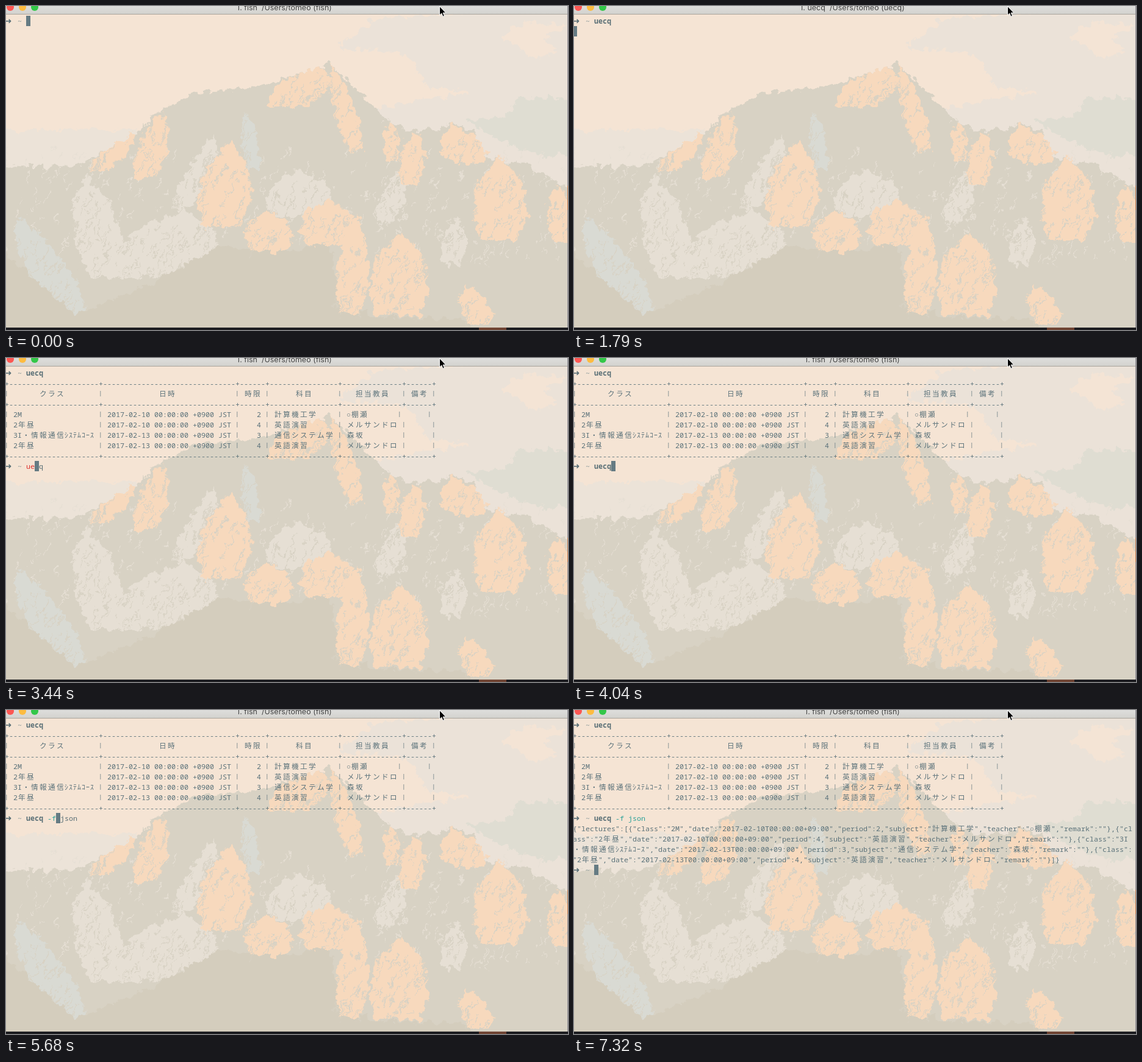
Recreate the animation shown at these times as an HTML page. Size 921 by 532 pixels, loop 8000 ms.

```html
<!DOCTYPE html>
<html lang="ja">
<head>
<meta charset="utf-8">
<title>Terminal</title>
<style>
  html, body { margin: 0; width: 100%; height: 100%; overflow: hidden; background: #1c1c20; }
  svg { display: block; }
  text { white-space: pre; }
  #term text {
    font: 500 11.667px "Noto Sans Mono", "Noto Sans CJK JP", "Noto Sans CJK", "DejaVu Sans Mono", monospace;
    fill: #5b727a;
  }
  #term .cmd { fill: #586e75; font-weight: 600; }
  #term .bad { fill: #dc322f; }
  #term .opt { fill: #2aa198; }
  #term .hint { fill: #586e75; }
  #term .dir { fill: #839496; }
  #term .bar { font-size: 9.5px; }
  #term .arrow { font: bold 13px "DejaVu Sans", sans-serif; fill: #586e75; }
  #title { font: 12.5px Inter, sans-serif; fill: #454545; text-anchor: middle; }
</style>
</head>
<body>
<svg width="921" height="532" viewBox="0 0 921 532">
  <defs>
    <linearGradient id="chrome" x2="0" y2="1">
      <stop stop-color="#dededc"/><stop offset="1" stop-color="#d3d2ce"/>
    </linearGradient>
    <clipPath id="pane"><path d="M0 14H920V528H0Z"/></clipPath>
    <filter id="rough" x="0" y="0" width="921" height="532" filterUnits="userSpaceOnUse" color-interpolation-filters="sRGB">
      <feTurbulence type="fractalNoise" baseFrequency=".08" numOctaves="4" seed="4"/>
      <feDisplacementMap in="SourceGraphic" scale="20" xChannelSelector="R" yChannelSelector="G"/>
    </filter>
  </defs>
  <path fill="#f5e4d4" d="M0 13H920V528H0Z"/>
  <g clip-path="url(#pane)"><g id="photo" filter="url(#rough)"></g></g>
  <path fill="#8d8a92" d="M920 0h1v528h-1z"/>
  <path fill="#c07a50" d="M920 295h1v40h-1z"/>
  <path fill="#6f4433" d="M775 528h45v4h-45z"/>
  <path fill="url(#chrome)" d="M0 0H920V13H0Z"/>
  <path fill="#a9a49c" d="M0 13H920V14H0Z"/>
  <circle cx="7" cy="2" r="6" fill="#fc5753"/>
  <circle cx="27" cy="2" r="6" fill="#fdbc40"/>
  <circle cx="47" cy="2" r="6" fill="#33c748"/>
  <text id="title" x="456" y="7"></text>
  <g id="term"></g>
  <path fill="#000" stroke="#fff" d="M710.5 .5v14.5l3.3-3 2.2 5.3 2.5-1-2.2-5.1h4.5z"/>
</svg>
<script>
const CELL = 7, LINE = 17, LEFT = -2, TOP = 16, COLS = 131, LOOP = 8000;
const term = document.getElementById('term');
const title = document.getElementById('title');
const photo = document.getElementById('photo');

function add(parent, tag, attrs, content = '') {
  const node = document.createElementNS('http://www.w3.org/2000/svg', tag);
  for (const name in attrs) node.setAttribute(name, attrs[name]);
  node.textContent = content;
  return parent.appendChild(node);
}

// Wallpaper
const ROCK = '#d8d2c4', SNOW = '#e6dfd4', SUNLIT = '#f7d9bd', ICE = '#d9dad3';

let seed = 7;
const random = () => (seed = seed * 16807 % 2147483647) / 2147483647;

const area = (fill, d) => add(photo, 'path', { fill, d });

// Slanting streaks; place() returns the start of each
function streaks(count, stroke, place) {
  let d = '';
  while (count-- > 0) {
    const length = 5 + random() * 14;
    d += `M${place()}l${-length * .45} ${length}`;
  }
  add(photo, 'path', { d, stroke, 'stroke-width': 1.6, fill: 'none' });
}

// A face of the mountain: a pointed slab from its peak down, shifted sideways by lean
function face(fill, x, y, width, height, lean) {
  const at = (side, depth) => [x + lean * depth + side * width, y + height * depth];
  area(fill, `M${[at(0, 0), at(.4, .3), at(.5, .7), at(.35, 1), at(-.35, 1), at(-.5, .7), at(-.4, .3)].join('L')}Z`);
  streaks(width * height / 220, ROCK, () => at((random() - .5) * .9, .2 + random() * .75));
}

area('#ece3d8', 'M-20 208Q100 198 260 206V300H-20Z');
area('#ebe2d8', 'M540 70L604 20 940 0V300H700L600 168 765 141 692 134 655 78Z');
area('#f4e4d5', 'M812 48L850 24 921 32 880 56 905 72 870 88Z');
area('#dfddd2', 'M752 188L820 180 840 150 940 152V238L880 250 800 215Z');
area(ROCK, 'M-20 264L120 262 215 208 250 174 310 142 420 131 530 94 580 142 620 184 665 207 740 196 765 203 788 250 850 258 940 310V550H-20Z');
streaks(260, SNOW, () => [random() * 921, 230 + random() * 180]);

[
  [130, 275, 80, 170, 35],
  [290, 335, 170, 110, -40],
  [345, 210, 40, 125, -60],
  [480, 270, 110, 75, 0],
  [655, 258, 40, 95, -35],
  [740, 345, 40, 80, -10],
].forEach(slab => face(SNOW, ...slab));

face(ICE, 392, 172, 26, 95, 14);
face(ICE, 20, 345, 75, 160, 85);
area('#d4cdbd', 'M-20 390L112 506 230 460 350 394 470 405 530 382 545 470 600 510 760 515V550H-20Z');

[
  [212, 208, 44, 62, -62],
  [258, 174, 50, 108, -32],
  [515, 98, 90, 68, -55],
  [534, 97, 36, 140, 40],
  [368, 222, 88, 140, -16],
  [430, 335, 80, 68, 0],
  [528, 318, 95, 75, 0],
  [575, 340, 52, 165, -12],
  [648, 372, 98, 136, -6],
  [632, 188, 28, 65, 0],
  [672, 208, 44, 85, -12],
  [735, 197, 75, 62, 22],
  [810, 248, 90, 135, -2],
  [905, 293, 46, 95, 8],
  [756, 458, 50, 65, 22],
].forEach(slab => face(SUNLIT, ...slab));

// Character grid
const isWide = ch => /[\u3041-\u9fff]/.test(ch);

function put(col, row, str, cls = '') {
  const xs = [];
  for (const ch of str) {
    xs.push(LEFT + col * CELL + (isWide(ch) ? 1 : 0));
    col += isWide(ch) ? 2 : 1;
  }
  const y = TOP + row * LINE + (cls === 'bar' ? 11 : 13);
  add(term, 'text', { x: xs.join(' '), y, class: cls }, str.replace(/ /g, '\u00a0'));
}

function cursor(col, row) {
  add(term, 'rect', { x: LEFT + col * CELL, y: TOP + row * LINE, width: CELL, height: LINE, fill: '#657b83' });
}

const lectures = [
  ['2M', '10', 2, '計算機工学', '○棚瀬'],
  ['2年昼', '10', 4, '英語演習', 'メルサンドロ'],
  ['3I・情報通信ｼｽﾃﾑｺｰｽ', '13', 3, '通信システム学', '森坂'],
  ['2年昼', '13', 4, '英語演習', 'メルサンドロ'],
];
const heads = ['クラス', '日時', '時限', '科目', '担当教員', '備考'];
const widths = [21, 31, 6, 16, 14, 6];
const span = str => [...str].reduce((sum, ch) => sum + (isWide(ch) ? 2 : 1), 0);

// Writes one table row; indent(text, width, index) gives the space before each text
function cells(row, texts, indent) {
  let col = 0;
  put(col, row, '|', 'bar');
  widths.forEach((width, i) => {
    const str = texts[i] ?? '';
    put(col + 1 + indent(str, width, i), row, str);
    // The circle counts as two columns in the padding but takes one
    col += width + 1 - (str.startsWith('○') ? 1 : 0);
    put(col, row, '|', 'bar');
  });
}

function table() {
  const rule = '+' + widths.map(width => '-'.repeat(width) + '+').join('');
  [1, 3, 8].forEach(row => put(0, row, rule));
  cells(2, heads, (str, width) => Math.floor((width - span(str)) / 2));
  lectures.forEach(([name, day, period, subject, teacher], i) => {
    const date = `2017-02-${day} 00:00:00 +0900 JST`;
    cells(4 + i, [name, date, String(period), subject, teacher],
      (str, width, index) => index === 2 ? width - 2 : 1);
  });
}

function json() {
  const text = JSON.stringify({
    lectures: lectures.map(([name, day, period, subject, teacher]) => ({
      class: name, date: `2017-02-${day}T00:00:00+09:00`, period, subject, teacher, remark: '',
    })),
  });
  let row = 10, line = '';
  for (const ch of text) {
    if (span(line + ch) > COLS) {
      put(0, row++, line);
      line = '';
    }
    line += ch;
  }
  put(0, row, line);
}

function prompt(row, typed = '', hint = '', cls = 'cmd') {
  add(term, 'text', { x: -1.5, y: TOP + row * LINE + 13, class: 'arrow' }, '➜');
  put(3, row, '~', 'dir');
  put(5, row, typed.slice(0, 4), cls);
  put(9, row, typed.slice(4), 'opt');
  put(5 + typed.length + 1, row, hint.slice(1), 'hint');
}

// Start time, typed text, suggestion (its first character lies under the cursor), command style
const steps = [
  [0, ''],
  [450, 'uec', 'q -graduate', 'bad'],
  [900, 'uecq', '', 'bad'],
  [1350, 'uecq', ' -graduate'],
  [1790, 'run'],
  [1940, ''],
  [3440, 'ue', 'cq', 'bad'],
  [3590, 'uec', 'q', 'bad'],
  [4040, 'uecq'],
  [4640, 'uecq '],
  [4790, 'uecq ', '-graduate'],
  [4930, 'uecq -', 'graduate'],
  [5680, 'uecq -f', ' json'],
  [5820, 'uecq -f ', 'json'],
  [6420, 'uecq -f j', 'son'],
  [6720, 'uecq -f jso', 'n'],
  [6870, 'uecq -f json'],
  [7170, 'run'],
  [7320, ''],
];

function draw([time, typed, hint, cls]) {
  const running = typed === 'run';
  const listed = time >= 1940, dumped = time >= 7170;
  const row = dumped ? 14 : listed ? 9 : 0;
  const job = running && !listed ? 'uecq' : 'fish';
  title.textContent = `1. ${job}  /Users/tomeo (${job})`;
  term.replaceChildren();
  if (listed) {
    prompt(0, 'uecq');
    table();
  }
  if (dumped) {
    prompt(9, 'uecq -f json');
    json();
  }
  if (running) {
    if (!listed) prompt(0, 'uecq');
    cursor(0, listed ? 14 : 1);
  } else {
    prompt(row, typed, hint, cls);
    cursor(5 + typed.length, row);
  }
}

const start = performance.now();
let shown;
function tick() {
  const t = (performance.now() - start) % LOOP;
  const step = steps.findLast(([time]) => time <= t);
  if (step !== shown) draw(shown = step);
  requestAnimationFrame(tick);
}
tick();
</script>
</body>
</html>
```
